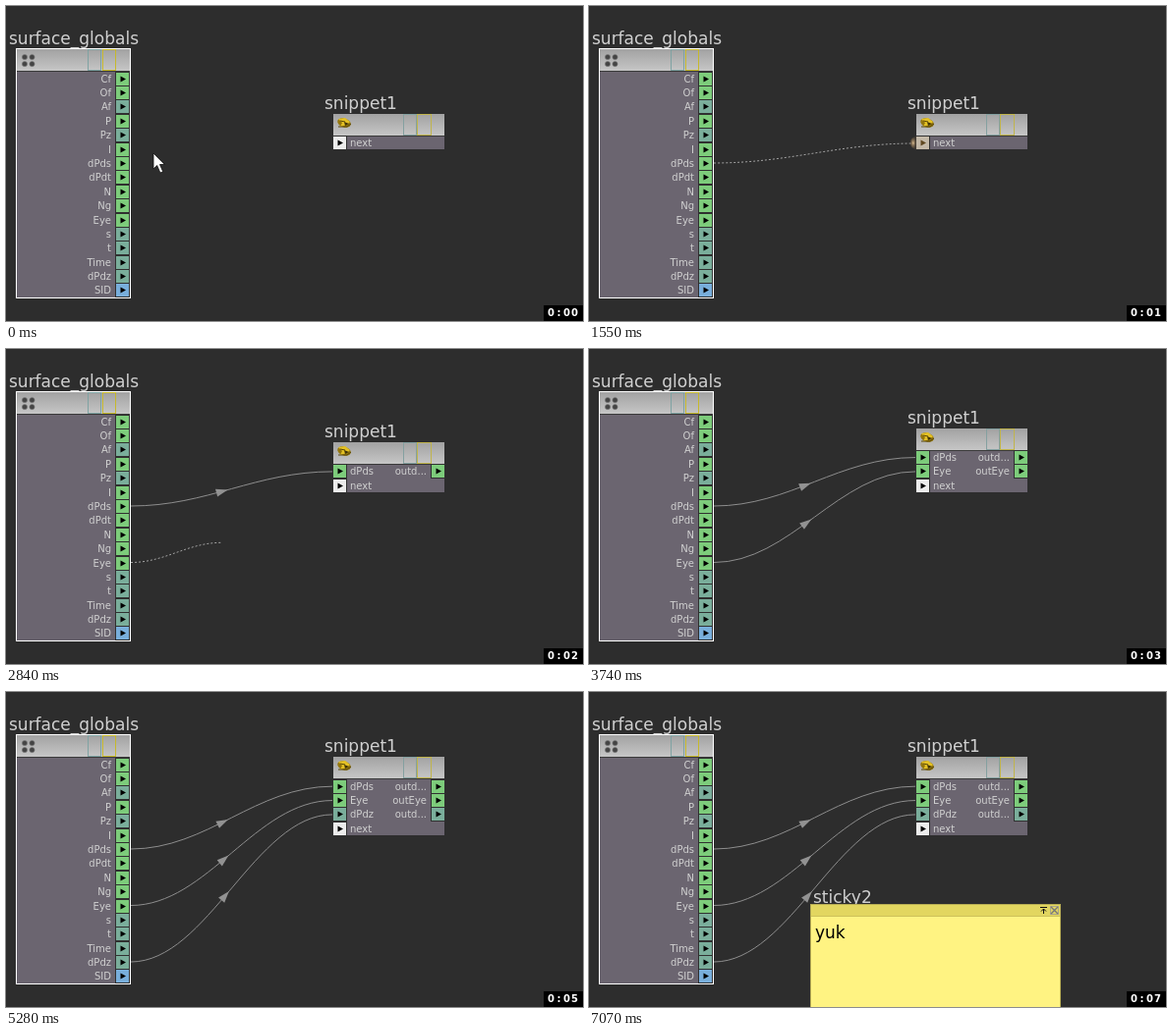
An HTML page that plays this animation: 587 by 321 pixels, repeating every 8 s.

```html
<!DOCTYPE html>
<html lang="en">
<head>
<meta charset="utf-8">
<title>Wiring a node</title>
<style>
  html, body { margin: 0; width: 100%; height: 100%; overflow: hidden; background: #2d2d2d; }
  svg { display: block; font: 10px "DejaVu Sans", sans-serif; fill: #d0d0d0; white-space: pre; }
  .big { font-size: 17px; }
  .end { text-anchor: end; }
  .clock { font-weight: bold; text-anchor: middle; fill: #fff; }
</style>
</head>
<body>
<svg id="stage" width="587" height="321" viewBox="0 0 587 321"></svg>
<script>
const LOOP = 8000, PITCH = 14.377, FIRST_ROW = 73.74, NEXT_ROW = 138.8;
const GREEN = '#7dcc7b', TEAL = '#7aae9b', BLUE = '#78aedb', WHITE = '#ececec', TAN = '#c4b9a8';
const OUTPUTS = 'Cf Of Af P Pz I dPds dPdt N Ng Eye s t Time dPdz SID'.split(' ');
const TEALS = ['Af', 'Pz', 's', 't', 'Time', 'dPdz'];
const TICKS = [1010, 2030, 3000, 4060, 5020, 6100, 7070];
const NEXT = { x: 331, y: 140 };

// Each drag: hover over an output, pull in timed steps to "next", then connect.
const DRAGS = [
  { name: 'dPds', out: 'outd...', hover: 320, start: 650, step: 150, steps: 7, done: 1710 },
  { name: 'Eye', out: 'outEye', hover: 2510, start: 2840, step: 160, steps: 4, done: 3580 },
  { name: 'dPdz', out: 'outd...', hover: 3900, start: 4220, step: 160, steps: 5, done: 5020 }
];

const color = name => name === 'SID' ? BLUE : TEALS.includes(name) ? TEAL : GREEN;
const outY = name => FIRST_ROW + PITCH * OUTPUTS.indexOf(name);
const rect = (x, y, w, h, fill, more = '') =>
  `<rect x="${x}" y="${y}" width="${w}" height="${h}" fill="${fill}" ${more}/>`;
const outline = (x, y, w, h, stroke, more = '') =>
  rect(x + .5, y + .5, w - 1, h - 1, 'none', `stroke="${stroke}" ${more}`);
const path = (d, more) => `<path d="${d}" ${more}/>`;
const text = (x, y, s, cls = '', more = '') =>
  `<text x="${x}" y="${y}" class="${cls}" ${more}>${s}</text>`;

function port(x, cy, fill, arrow = '#000') {
  const y = Math.round(cy - 6), c = y + 6.5;
  return rect(x - 1, y - 1, 15, 15, '#303030') + rect(x, y, 13, 13, fill) +
    path(`M${x + 4.5} ${c - 3}l5.5 3l-5.5 3z`, `fill="${arrow}"`);
}

function halo(x, y, side) {
  const d = `M${x} ${y - 6.5}a6.5 6.5 0 0 ${side > 0 ? 1 : 0} 0 13z`;
  return path(d, 'fill="url(#glow)"');
}

function wire(x1, y1, x2, y2, dashed) {
  const reach = (x2 - x1) * .38;
  const curve = path(`M${x1} ${y1}C${x1 + reach} ${y1} ${x2 - reach} ${y2} ${x2} ${y2}`,
    `fill="none" stroke="${dashed ? '#a2a2a2' : '#8d8d8d'}" ${dashed ? 'stroke-dasharray="2 2"' : ''}`);
  if (dashed) return curve;
  const angle = Math.atan2(y2 - y1, x2 - x1 - reach) * 180 / Math.PI;
  return curve + path('M-4 0l-12 -4v8z', `fill="#929292"
    transform="translate(${(x1 + x2) / 2} ${(y1 + y2) / 2}) rotate(${angle})"`);
}

function header(x, y, w) {
  return rect(x, y, w, 22, 'url(#metal)') + rect(x, y + 22, w, 1, '#3a3a3a');
}

function globalsNode(hovered) {
  const dots = [[19, 52], [26.5, 52], [19, 59], [26.5, 59]]
    .map(([x, y]) => `<circle cx="${x}" cy="${y}" r="2.6" fill="#444" stroke="#777" stroke-width=".6"/>`).join('');
  const rows = OUTPUTS.map(name => {
    const y = outY(name), hot = name === hovered;
    return text(107, Math.round(y) + 4, name, 'end') +
      port(112, y, hot ? TAN : color(name), hot ? '#604820' : '#000') + (hot ? halo(126.5, y, 1) : '');
  }).join('');
  return text(3, 39, 'surface_globals', 'big') +
    rect(11, 44, 115, 253, '#6b6570') + header(11, 44, 115) + dots +
    outline(83, 44, 14, 22, '#7fa3a3') + outline(98, 44, 14, 22, '#c6b92c') +
    rows + outline(10, 43, 117, 255, '#fff');
}

function snippetNode(wired, hot) {
  const n = wired.length, top = Math.floor(110 - 14.4 * n);
  const inRow = (y, label, fill, arrow) =>
    port(333, y, fill, arrow) + text(350, Math.round(y) + 4, label);
  const rows = wired.map((d, i) => {
    const y = NEXT_ROW - PITCH * (n - i);
    return inRow(y, d.name, color(d.name)) +
      text(428, Math.round(y) + 4, d.out, 'end') + port(433, y, color(d.name));
  }).join('');
  const icon = `<g transform="translate(344 ${top + 9})">` +
    '<ellipse rx="7" ry="4.5" transform="rotate(18)" fill="#94760c"/>' +
    path('M-6 -4L1 -5L6 -1L3 2L-4 4L-2 0z', 'fill="#e4c124"') +
    path('M0 -1L5 1L1 3z', 'fill="#403408"') +
    path('M-4 -2L1 -1M-6 4L3 4L7 1', 'fill="none" stroke="#594708"') + '</g>';
  return text(324, top - 5, 'snippet1', 'big') +
    rect(333, top, 113, 146 - top, '#6b6570') + header(333, top, 113) + icon +
    outline(404, top, 14, 22, '#84a0a0') + outline(418, top, 15, 22, '#c0b44c') + rows +
    inRow(NEXT_ROW, 'next', hot ? TAN : WHITE, hot ? '#604820' : '#000') +
    (hot ? halo(333, 139.5, -1) : '');
}

function sticky() {
  return text(228, 215, 'sticky2', 'big') +
    rect(225, 216, 255, 105, '#fff382') + rect(225, 216, 255, 12, '#e2d660') +
    rect(225, 228, 255, 1, '#cdc15a') + outline(225, 216, 255, 110, '#b9ae54') +
    path('M459 219.5h7M462.5 226v-5M460 223.5l2.5 -2.5l2.5 2.5', 'fill="none" stroke="#111"') +
    outline(469, 218, 9, 9, '#aaa48a') +
    path('M470 219l7 7m0 -7l-7 7', 'stroke="#777" stroke-width="1.4"') +
    text(230, 251, 'yuk', 'big', 'fill="#000"');
}

function cursor(x, y) {
  return path(`M${x} ${y}v16l3.7 -3.5l3.2 7.5l2.8 -1.2l-3.2 -7.3h5z`,
    'fill="#fff" stroke="#111" stroke-width=".8"');
}

function clock(t) {
  const s = '0:0' + TICKS.filter(tick => t >= tick).length;
  return rect(547, 305, 40, 16, '#000') +
    [...s].map((c, i) => text(554.5 + 8 * i, 316, c, 'clock')).join('');
}

const DEFS = `<defs>
  <linearGradient id="metal" x2="0" y2="1"><stop stop-color="#a2a2a2"/><stop offset="1" stop-color="#c6c6c6"/></linearGradient>
  <radialGradient id="glow"><stop stop-color="#d8b98c"/><stop offset="1" stop-color="#70573a" stop-opacity=".25"/></radialGradient>
</defs>`;

function scene(t) {
  const wired = DRAGS.filter(d => t >= d.done);
  const hover = DRAGS.find(d => t >= d.hover && t < d.start);
  const drag = DRAGS.find(d => t >= d.start && t < d.done);
  let wires = wired.map((d, i) =>
    wire(127, outY(d.name), 332, NEXT_ROW + .5 - PITCH * (wired.length - i))).join('');
  let landed = false;
  if (drag) {
    const u = Math.min(1, (Math.floor((t - drag.start) / drag.step) + 1) / drag.steps);
    const p = 1 - (1 - u) ** 2.1, y = outY(drag.name);
    landed = u === 1;
    wires += wire(127, y, 127 + (NEXT.x - 127) * p, y + (NEXT.y - y) * p ** 1.7, true);
  }
  return DEFS + rect(0, 0, 587, 321, '#2d2d2d') + wires +
    globalsNode(hover && hover.name) + snippetNode(wired, landed) +
    (t < 160 ? cursor(150, 150) : t < 320 ? cursor(134, 161) : '') +
    (t >= 6590 && t < 6750
      ? outline(226, 226, 255, 120, '#fff', 'stroke-dasharray="2 2" stroke-dashoffset=".5"') : '') +
    (t >= 6750 ? sticky() : '') + clock(t);
}

const stage = document.getElementById('stage');
const begin = performance.now();
let shown = '';
function draw() {
  const next = scene((performance.now() - begin) % LOOP);
  if (next !== shown) stage.innerHTML = shown = next;
  requestAnimationFrame(draw);
}
draw();
</script>
</body>
</html>
```
